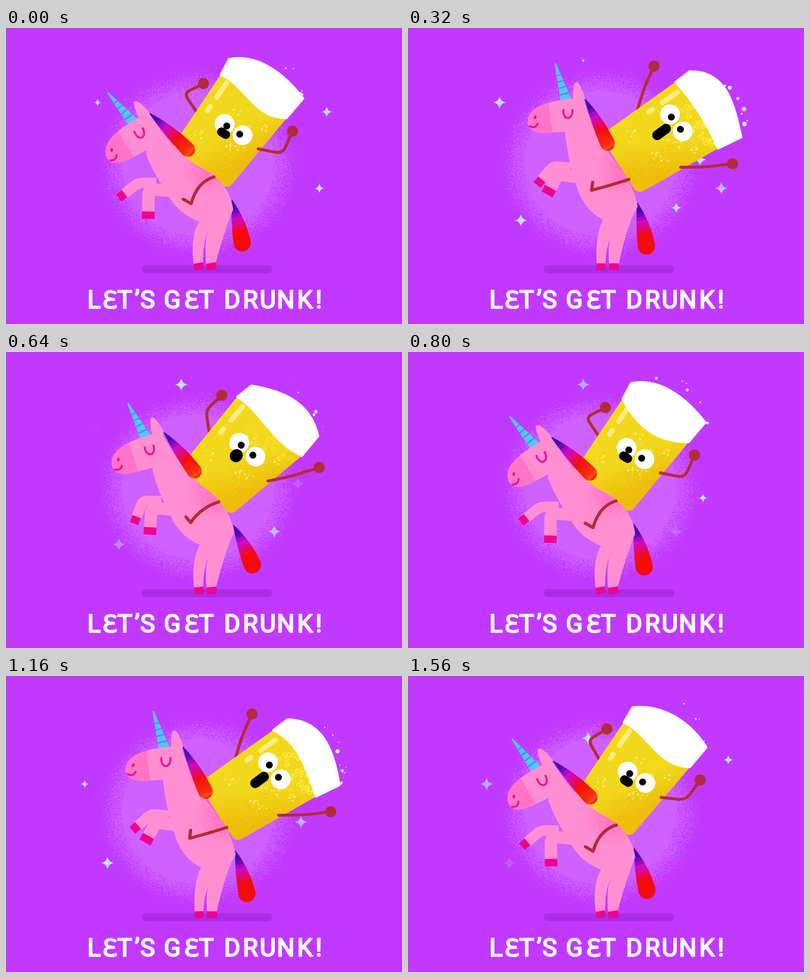
These frames come from a looping animation (800x600 px, 1600 ms). An HTML page with a canvas:

```html
<!DOCTYPE html>
<html lang="en">
<head>
<meta charset="utf-8">
<title>Party ride</title>
<style>
html, body { margin: 0; width: 800px; height: 600px; overflow: hidden; background: #c139ff; }
canvas, svg { position: absolute; left: 0; top: 0; }
text {
  font: 400 50px Roboto, "Noto Sans", sans-serif; text-anchor: middle;
  fill: #fff; stroke: #fff; stroke-width: 2.4; stroke-linejoin: round;
}
.round { font-family: "Noto Sans", sans-serif; }
</style>
</head>
<body>
<canvas id="stage" width="800" height="600"></canvas>
<svg width="800" height="600" role="img" aria-label="LET'S GET DRUNK!">
  <text y="568" x="178 210 240 265 286 312 336 375 405 430 457 494 529 565 604 632">L<tspan class="round">Ɛ</tspan>T’S G<tspan class="round">Ɛ</tspan>T DRUNK!</text>
</svg>
<script>
const LOOP = 1600, STEP = 40, BEAT = 800;
const g = document.getElementById('stage').getContext('2d');
const PINK = '#ff8fd2', HOOF = '#f0048c', LIMB = '#b32b38', FACE = '#ee1290';
const TAU = Math.PI * 2, RAD = Math.PI / 180;

let seed = 7;
const rnd = () => (seed = seed * 16807 % 2147483647) / 2147483647;
const bell = () => (rnd() + rnd() + rnd()) * 2 / 3 - 1;
const many = (n, fn) => Array.from({ length: n }, (_, i) => fn(i));
const mix = (a, b, k) => a + (b - a) * k;
const mixAll = (a, b, k) => a.map((v, i) => mix(v, b[i], k));
const ease = k => .5 - .5 * Math.cos(Math.PI * Math.min(1, Math.max(0, k)));
const wave = (t, period = BEAT) => Math.cos(TAU * t / period);

// Rear up quickly, hold, sink back
function swing(t) {
  t = (t + BEAT) % BEAT;
  return ease(t / 240) - ease((t - 420) / 380);
}

const fill = (style, shape) => { g.fillStyle = style; shape ? g.fill(shape) : g.fill(); };
function stroke(style, width, shape) {
  g.strokeStyle = style;
  g.lineWidth = width;
  shape ? g.stroke(shape) : g.stroke();
}
function disc(x, y, r, style) {
  g.beginPath();
  g.arc(x, y, r, 0, TAU);
  fill(style);
}
function inFrame(x, y, angle, paint) {
  g.save();
  g.translate(x, y);
  g.rotate(angle);
  paint();
  g.restore();
}
const OPS = { M: ['moveTo', 2], L: ['lineTo', 2], Q: ['quadraticCurveTo', 4], C: ['bezierCurveTo', 6] };
function trace(ops, p) {
  let i = 0;
  g.beginPath();
  for (const o of ops) {
    const [name, n] = OPS[o];
    g[name](...p.slice(i, i += n));
  }
}
// Two-part limb with a rounded joint
function limb([ax, ay], [bx, by], [cx, cy], k = .7) {
  trace('MLQL', [ax, ay, mix(ax, bx, k), mix(ay, by, k), bx, by, mix(cx, bx, k), mix(cy, by, k), cx, cy]);
}

// Body outline, lowered and rearing
const BODY_OPS = 'MQQQLQQLQQQ';
const LOW = [288, 172, 338, 251, 392, 282, 450, 309, 459, 368, 442, 408, 424, 475, 404, 478,
  399, 418, 416, 398, 398, 421, 398, 475, 379, 478, 372, 423, 390, 393, 342, 373, 325, 333, 296, 292, 283, 255];
const HIGH = [354, 142, 373, 210, 412, 262, 454, 309, 464, 362, 445, 390, 426, 477, 406, 477,
  404, 442, 409, 425, 400, 446, 399, 477, 381, 477, 378, 421, 394, 388, 353, 369, 338, 312, 324, 271, 317, 210];

// Head parts around the eye
const HEAD = new Path2D('M34-32L12-31Q-15-29-37-23C-68-15-82 0-81 17C-80 34-62 41-31 38L-5 36L10 36Z');
const MUZZLE = new Path2D('M-39-22C-68-15-82 0-81 17C-80 34-62 41-31 38Z');
const EAR = new Path2D('M11-29C10-54 13-65 17-64C24-63 31-45 35-30Z');
const HORN = new Path2D('M-27-102Q-25-106-23-100L7-30L-15-27Z');
const STRIPES = new Path2D('M-24-77L-13-80M-22-64L-7-68M-20-51L-3-56M-17-38L3-43');
const LINES = new Path2D('M-9-8C-11 14 11 14 9-8M-77 25Q-67 31-61 20');

// birth, x, y
const stars = [
  [-160, 648, 170], [-140, 633, 325], [-75, 185, 151], [0, 590, 267], [80, 228, 390], [165, 542, 364],
  [300, 354, 66], [680, 596, 296], [920, 205, 379], [1070, 159, 219], [1220, 364, 126], [1430, 647, 170]];

const specks = many(700, () => [bell(), bell(), rnd()]);
const clusters = many(7, () => [.15 + rnd() * .7, .3 + rnd() * .65]);
const bubbles = many(46, i => {
  const [u, v] = clusters[i % 7];
  return [u + bell() * .12, v + bell() * .08, .8 + rnd() * 1.6];
});
const rings = many(40, () => [.25 + rnd() * .7, .84 + rnd() * .3, 1.5 + rnd() * 2.8]);
const drops = many(52, () => ({ birth: rnd() * LOOP, u: Math.sqrt(rnd()), r: 1.4 + rnd() ** 2 * 3.4 }));

const backdrop = document.createElement('canvas');
backdrop.width = 800;
backdrop.height = 600;
(function paintBackdrop(b) {
  b.fillStyle = '#c139ff';
  b.fillRect(0, 0, 800, 600);
  b.fillStyle = '#ce61ff';
  b.beginPath();
  b.ellipse(388, 274, 154, 147, 0, 0, TAU);
  b.fill();
  for (let i = 0; i < 40000; i++) {
    const a = rnd() * TAU, r = .74 + Math.abs(bell()) * .3;
    b.fillRect(Math.round(388 + Math.cos(a) * 199 * r), Math.round(274 + Math.sin(a) * 190 * r), 1, 1);
  }
  b.fillStyle = '#aa2de4';
  b.beginPath();
  b.roundRect(274, 481, 264, 16, 8);
  b.fill();
})(backdrop.getContext('2d'));

function drawStar([birth, x, y], t) {
  const age = t - birth;
  if (age <= 0 || age >= 720) return;
  const r = 12.5 * Math.min(1, Math.sqrt(age / 240)), q = r * .16;
  g.globalAlpha = Math.min(1, (720 - age) / 340);
  inFrame(x, y, 0, () => {
    trace('MQQQQ', [0, -r, q, -q, r, 0, q, q, 0, r, -q, q, -r, 0, -q, -q, 0, -r]);
    fill('#b8e4ff');
  });
  g.globalAlpha = 1;
}

// Tapered lock: hard colour bands from violet to red
function lock(x, y, ex, ey, r, orangeTip) {
  const len = Math.hypot(ex - x, ey - y), grad = g.createLinearGradient(0, 0, len + r, 0);
  const band = (from, to, hue) => {
    const color = `hsl(${hue} 92% ${mix(36, 50, (hue - 258) / 102)}%)`;
    grad.addColorStop(from, color);
    grad.addColorStop(to, color);
  };
  for (let i = 0; i < 7; i++) band(.15 + i * .065 - (i ? 0 : .15), .215 + i * .065, 262 + i * 14);
  band(.605, 1, 360);
  if (orangeTip) [8, 16].forEach((h, i) => band(.88 + i * .06, 1, 360 + h));
  inFrame(x, y, Math.atan2(ey - y, ex - x), () => {
    trace('MQ', [0, 0, len * .5, -r * 1.05, len, -r]);
    g.arc(len, 0, r, -Math.PI / 2, Math.PI / 2);
    g.quadraticCurveTo(len * .5, r * .75, 0, 0);
    fill(grad);
  });
}

// Corners, plus a map from (across, up) to the stage
function makeGlass(rear, lean) {
  const tilt = mix(36.6, 57.4, lean) * RAD, fan = (2.9 + 11.6 * lean * (1 - lean)) * RAD;
  const edge = ([x, y], a, len) => [x + Math.sin(a) * len, y - Math.cos(a) * len];
  const br = mixAll([448, 327], [464, 337], rear);
  const bl = [br[0] - Math.cos(tilt) * 141, br[1] - Math.sin(tilt) * 141];
  const tl = edge(bl, tilt - fan, mix(178, 187, lean)), tr = edge(br, tilt + fan, 187);
  const at = (u, v) => mixAll(mixAll(bl, br, u), mixAll(tl, tr, u), v);
  const mid = at(.5, 1), rimTurn = Math.atan2(tr[1] - tl[1], tr[0] - tl[0]);
  const c = Math.cos(rimTurn), s = Math.sin(rimTurn);
  const onRim = (x, y) => [mid[0] + x * c - y * s, mid[1] + x * s + y * c];
  return { tilt, tl, tr, br, bl, at, onRim };
}

function drawGlass(t, glass, rear) {
  const { tl, tr, br, bl, at, onRim } = glass;
  const rise = -75 - 13 * rear, tip = 20 * Math.sin(TAU * t / BEAT);
  const slosh = 80 * (1 - t / LOOP) * Math.sin(TAU * t / 640);
  const top = [...onRim(-83, -36), ...onRim(-44, rise - tip), ...onRim(20, rise + tip), ...onRim(86, -52)];

  g.save();
  trace('MLLCL', [...bl, ...tl, ...top, ...tr]);
  g.arcTo(...br, ...bl, 14);
  g.closePath();
  const shade = g.createLinearGradient(...at(.54, .5), ...at(.9, .34));
  shade.addColorStop(0, '#f2d81c');
  shade.addColorStop(1, '#eebd0a');
  fill(shade);
  g.clip();
  for (const [a, b, c] of specks) {
    g.fillStyle = c < .5 ? '#eebd0a' : '#f2d81c';
    g.fillRect(...at(.72 + a * .2, .42 + b * .5), 1.4, 1.4);
  }
  for (const [from, to] of [[.96, .76], [.635, .58]]) {
    trace('ML', [...at(.12, from), ...at(.12, to)]);
    stroke('#faee80', 10);
  }
  for (const [u, v, r] of bubbles) disc(...at(u, v), r, '#f9ec7c');
  g.globalAlpha = rear;
  for (const [u, v, r] of rings) {
    g.beginPath();
    g.arc(...at(u, v - .15 * (1 - rear)), r, 0, TAU);
    stroke('#fff04c', 1.5);
  }
  g.restore();

  trace('MLCLC', [...tl, ...top, ...tr, ...onRim(25, 12 + 25 * wave(t)), ...onRim(-27, slosh - 10), ...tl]);
  g.closePath();
  fill('#fff');
  stroke('#fff', 4);
}

function drawFace({ at, tilt }, rear, lean) {
  const [x, y] = at(mix(.55, .44, lean), mix(.57, .77, lean));
  inFrame(x, y, tilt - 4 * RAD, () => {
    for (const side of [-1, 1]) {
      disc(side * 21.5, 0, 20, '#fff');
      disc(side * 15.5, 1.2, 7, '#000');
    }
    const w = mix(14, 10, lean), h = mix(9, 21, lean);
    g.beginPath();
    g.roundRect(mix(-13, -3, lean) - w, mix(17, 35, rear) - h, w * 2, h * 2, Math.min(w, h));
    fill('#000');
  });
}

// Elbow found from the bone length
function drawArm(from, hand, bone, side) {
  const dx = hand[0] - from[0], dy = hand[1] - from[1], d = Math.hypot(dx, dy);
  const out = side * Math.sqrt(Math.max(9, bone * bone - d * d / 4)) / d;
  limb(from, [from[0] + dx / 2 - dy * out, from[1] + dy / 2 + dx * out], hand);
  stroke(LIMB, 6);
  disc(...hand, 11.3, LIMB);
}

function drawForeleg(shoulder, knee, angle, shin, width, hoof) {
  const down = len => [knee[0] - Math.sin(angle * RAD) * len, knee[1] + Math.cos(angle * RAD) * len];
  g.lineCap = 'butt';
  limb(shoulder, knee, down(shin), .72);
  stroke(PINK, width);
  trace('ML', [...down(shin), ...down(shin + 15)]);
  stroke(HOOF, hoof);
  g.lineCap = 'round';
}

function drawBody(rear) {
  const p = mixAll(LOW, HIGH, rear), point = i => p.slice(i * 2, i * 2 + 2);
  g.save();
  trace(BODY_OPS, p);
  g.closePath();
  fill(PINK);
  g.clip();
  const x = mix(414, 440, rear), y = mix(284, 286, rear);
  const shade = g.createRadialGradient(x, y, 5, x, y, 62);
  shade.addColorStop(0, 'rgba(255,88,178,.45)');
  shade.addColorStop(1, 'rgba(255,88,178,0)');
  g.fillStyle = shade;
  g.fillRect(x - 62, y - 62, 124, 124);
  g.fillStyle = 'rgba(255,92,180,.45)';
  for (const [u, v] of specks) g.fillRect(x + u * 60, y + v * 60, 1.4, 1.4);
  g.restore();
  for (const [right, left] of [[6, 7], [11, 12]]) {
    const [rx, ry] = point(right), [lx, ly] = point(left);
    const k = 14 / Math.hypot(rx - lx, ry - ly), dx = (ly - ry) * k, dy = (rx - lx) * k;
    trace('MLLL', [lx, ly, rx, ry, rx + dx, ry + dy, lx + dx, ly + dy]);
    fill(HOOF);
  }
}

function drawHead() {
  fill('#5cc2f2', HORN);
  g.save();
  g.clip(HORN);
  stroke('#349fdc', 3.2, STRIPES);
  g.restore();
  fill(PINK, EAR);
  fill(PINK, HEAD);
  fill('#ff74c9', MUZZLE);
  stroke(FACE, 4, LINES);
  g.beginPath();
  g.ellipse(-66, 7, 2.6, 4, .4, 0, TAU);
  fill(FACE);
}

function drawDrop({ birth, u, r }, t, onRim) {
  const age = (t - birth + LOOP) % LOOP / 260;
  if (age > 1) return;
  disc(...onRim(mix(-92, 98, u), -38 - 42 * Math.sin(Math.PI * u) - 24 * age), r * Math.sin(Math.PI * age), '#fbeaff');
}

function draw(t) {
  const rear = swing(t), turn = swing(t - 45), late = swing(t - 90), lean = Math.min(rear, turn);
  const pose = (low, high, k = rear) => mixAll(low, high, k);
  const glass = makeGlass(rear, lean);
  const eye = pose([271, 214], [323, 174]), headTurn = mix(-25, 0, turn) * RAD;
  g.lineCap = g.lineJoin = 'round';
  g.drawImage(backdrop, 0, 0);
  stars.forEach(s => drawStar(s, t));

  const [tx, ty] = pose([456, 347], [463, 353]), wag = (16 + 11 * wave(t - 570)) * RAD;
  lock(tx, ty, tx + Math.sin(wag) * 91, ty + Math.cos(wag) * 91, 17.5);

  drawArm(glass.at(0, .5), [mix(399, 497, lean), mix(118, 77, late)], 44, -1);
  drawGlass(t, glass, rear);
  drawFace(glass, rear, lean);
  drawArm(glass.at(.97, .55), [mix(567, 656, late), mix(209, 275, lean)], 50, 1);
  drops.forEach(d => drawDrop(d, t, glass.onRim));

  drawForeleg(pose([304, 314], [329, 283]), pose([267, 314], [293, 280]), 35 + 17 * wave(t, BEAT / 2), 35, 21, 18);
  drawBody(rear);
  drawForeleg(pose([332, 330], [341, 302]), pose([288, 327], [303, 297]), 14 - 15 * wave(t + 60), mix(45, 31, rear), 25, 25.5);

  const c = Math.cos(headTurn), s = Math.sin(headTurn);
  lock(eye[0] + 33 * c + 33 * s, eye[1] + 33 * s - 33 * c, ...pose([367, 246], [403, 234]), 15, true);
  inFrame(...eye, headTurn, drawHead);
  trace('MQL', pose([420, 302, 386, 312, 374, 356, 358, 347], [446, 307, 409, 319, 371, 329, 373, 313]));
  stroke(LIMB, 6.4);
}

const start = performance.now();
function tick() {
  draw(Math.floor((performance.now() - start) / STEP) * STEP % LOOP);
  requestAnimationFrame(tick);
}
tick();
</script>
</body>
</html>
```
